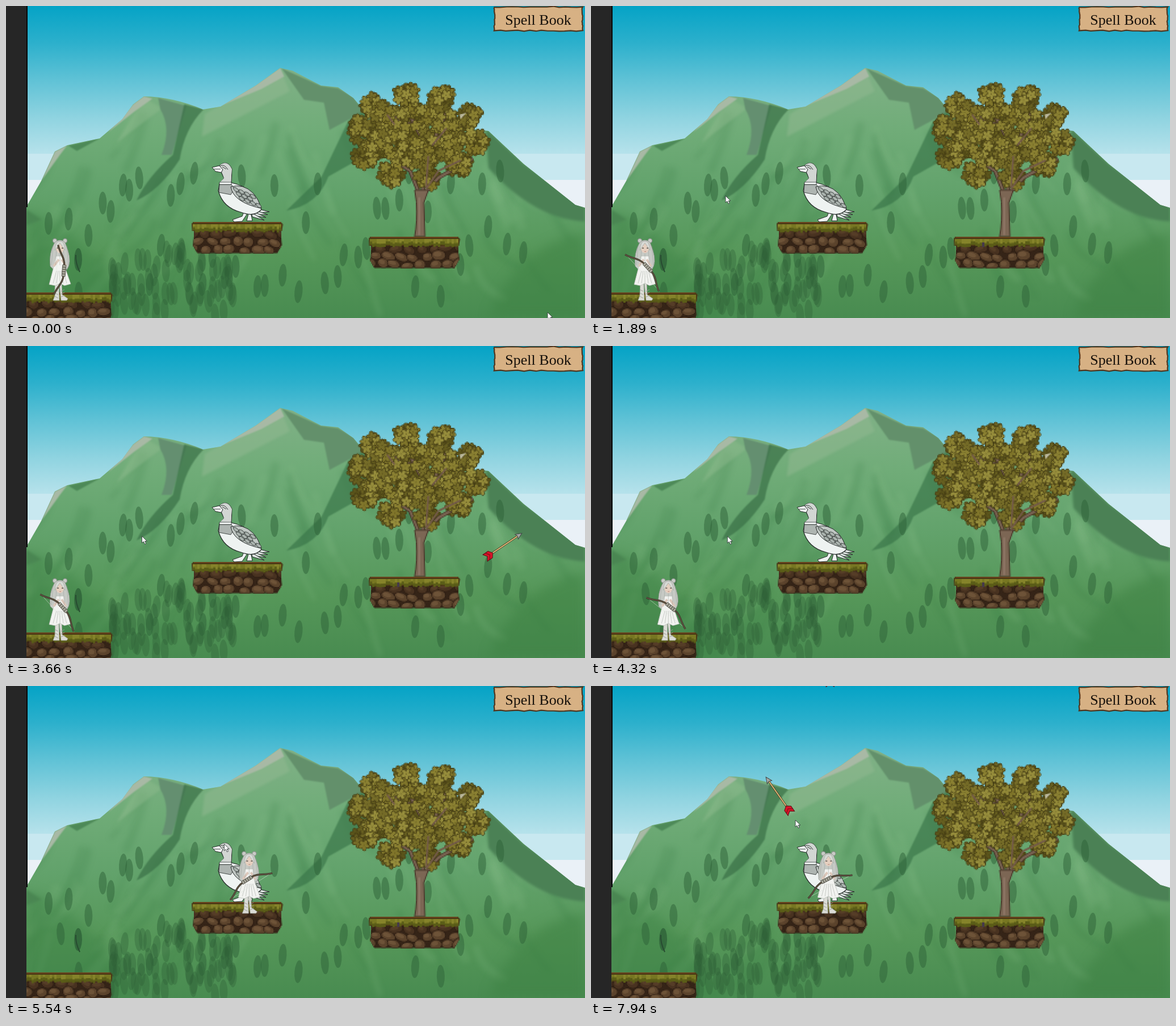
These frames come from a looping animation (1020x549 px, 8 s). An HTML page with a canvas:

```html
<!DOCTYPE html>
<html>
<head>
<meta charset="utf-8">
<style>
html, body { margin: 0; width: 100%; height: 100%; overflow: hidden; background: #262626; }
canvas { display: block; }
</style>
</head>
<body>
<canvas id="stage" width="1020" height="549"></canvas>
<script>
const W = 1020, H = 549, LOOP = 8000, TAU = Math.PI * 2;
const stage = document.getElementById('stage').getContext('2d');
const clamp = (v, a, b) => Math.min(b, Math.max(a, v));

let seed = 7;
const rand = (a = 0, b = 1) => {
  seed = (seed * 1664525 + 1013904223) % 4294967296;
  return a + (b - a) * seed / 4294967296;
};
const pick = list => list[Math.floor(rand(0, list.length))];

function layer(w, h) {
  const canvas = document.createElement('canvas');
  canvas.width = w;
  canvas.height = h;
  return canvas.getContext('2d');
}

function shape(c, d, fill, stroke, width = 1) {
  const p = new Path2D(d);
  if (fill) { c.fillStyle = fill; c.fill(p); }
  if (stroke) { c.strokeStyle = stroke; c.lineWidth = width; c.stroke(p); }
}

function oval(c, x, y, rx, ry, fill, turn = 0) {
  c.fillStyle = fill;
  c.beginPath();
  c.ellipse(x, y, rx, ry, turn, 0, TAU);
  c.fill();
}

function fade(c, y0, y1, colors) {
  const g = c.createLinearGradient(0, y0, 0, y1);
  colors.forEach((color, i) => g.addColorStop(i / (colors.length - 1), color));
  return g;
}

// Paints at half size and enlarges it for a chunky pixel look.
function pixelated(c, x, y, w, h, paint) {
  const small = layer(w / 2, h / 2);
  small.scale(.5, .5);
  small.translate(-x, -y);
  paint(small);
  c.imageSmoothingEnabled = false;
  c.drawImage(small.canvas, x, y, w, h);
  c.imageSmoothingEnabled = true;
}

function paintSky(c) {
  c.fillStyle = fade(c, 0, 260, ['#05a3c6', '#2cb0cc', '#5fc2d6', '#8ed3e0', '#b6e2eb']);
  c.fillRect(0, 0, W, 260);
  c.fillStyle = '#c8e8f0';
  c.fillRect(0, 260, W, 46);
  c.fillStyle = '#eaf1f7';
  c.fillRect(0, 306, W, 80);
}

function paintMountains(c) {
  c.save();
  const ridge = new Path2D('M36 353L62 308 86 256 108 245 165 233 205 199 224 173 243 159 Q295 160 347 182L378 177 440 140 483 109 505 114 555 140 585 143 612 162 640 195 850 220 912 278 1003 350 1020 355V549H36Z');
  c.fillStyle = fade(c, 110, H, ['#80b187', '#70ac78', '#62a26b', '#569759', '#488b50']);
  c.fill(ridge);
  c.clip(ridge);

  // long soft brush strokes down the slopes
  c.filter = 'blur(5px)';
  c.lineCap = 'round';
  for (let i = 0; i < 80; i++) {
    const x = rand(50, 980), y = rand(180, 470), lean = x < 480 ? -1 : 1;
    const tone = i % 2 ? 'rgba(140,195,140,.15)' : 'rgba(45,110,60,.13)';
    shape(c, `M${x} ${y}q${lean * 8} 35 ${lean * rand(20, 60)} ${rand(50, 100)}`, null, tone, rand(6, 18));
  }
  c.filter = 'blur(10px)';
  shape(c, 'M36 360Q150 400 230 549H36Z', 'rgba(60,130,70,.45)');
  shape(c, 'M850 549Q900 420 1020 400V549Z', 'rgba(62,130,68,.55)');

  c.filter = 'blur(2px)';
  shape(c, 'M483 112L350 190 345 230 500 150Z', 'rgba(145,185,145,.55)');
  shape(c, 'M243 161L195 240 275 180Z', 'rgba(140,185,140,.5)');
  shape(c, 'M845 215L912 278 1020 355V379Q930 375 850 285Z', '#4b8155');
  shape(c, 'M36 358L63 376 36 386Z', '#4a8652');

  c.filter = 'blur(1px)';
  shape(c, 'M268 162L318 176 292 262 274 262Q292 215 272 182Z', '#648f70');
  shape(c, 'M314 173L348 182Q315 215 306 270 270 325 230 342 250 300 294 262Z', 'rgba(57,111,70,.7)');
  shape(c, 'M486 110L555 141 585 145 612 161 630 186 570 218 560 170 525 165Z', '#63906b');
  shape(c, 'M632 182L602 204 556 300 494 360Q550 350 568 300L650 254Z', 'rgba(54,113,70,.62)');
  shape(c, 'M110 246L165 233 125 255Z', '#4d8958');
  for (const snow of ['M483 109L440 139 370 179 450 146 490 124Z', 'M243 159L224 173 180 222 226 186 258 163Z', 'M108 245L86 256 62 308 95 262Z'])
    shape(c, snow, '#a8b9a5');
  c.restore();
}

function paintBushes(c) {
  c.save();
  c.filter = 'blur(.7px)';
  const bush = (x, y, alpha) => oval(c, x, y, 7, 20, `rgba(46,98,56,${alpha})`, rand(-.1, .1));
  for (let x = 78; x < 920; x += 18) bush(x + rand(-6, 6), rand(290, 515), .5);
  for (let i = 0; i < 75; i++) {
    const x = rand(182, 400);
    bush(x, rand(415 + Math.abs(x - 290) * .4, 545), .36);
  }
  bush(127, 446, .8);
  c.restore();
  shape(c, 'M123 438Q122 452 130 468', null, '#284b31', 2);
}

function paintPlatform(c, x, y) {
  pixelated(c, x - 2, y - 2, 166, 60, p => {
    p.save();
    const block = new Path2D(`M${x + 5} ${y + 8}H${x + 156}L${x + 159} ${y + 40} ${x + 151} ${y + 55}H${x + 10}L${x + 3} ${y + 42}Z`);
    p.fillStyle = '#352417';
    p.fill(block);
    p.clip(block);
    for (let row = 0; row < 3; row++)
      for (let i = 0; i < 8; i++) {
        const sx = x + i * 23 + row % 2 * 11 + rand(-4, 4), sy = y + 21 + row * 14 + rand(-3, 3);
        const rx = rand(8, 13), ry = rand(6, 9), turn = rand(-.5, .5);
        oval(p, sx, sy, rx + 1, ry + 1, '#2a1b11', turn);
        oval(p, sx, sy, rx, ry, row ? '#5b432c' : '#483220', turn);
        oval(p, sx - 2, sy - 2, rx * .6, ry * .5, row ? '#6d5338' : '#553d27', turn);
      }
    p.restore();
    shape(p, `M${x + 3} ${y}H${x + 157}L${x + 161} ${y + 4} ${x + 159} ${y + 16}H${x + 1}L${x} ${y + 3}Z`, '#4a3715');
    for (let i = 2; i < 158; i += 4) {
      const drop = rand(4, 9);
      p.fillStyle = '#5a5c17';
      p.fillRect(x + i, y + 4, 4, 6 + drop);
      p.fillStyle = pick(['#85832a', '#777722']);
      p.fillRect(x + i, y + 4, 4, drop);
    }
    p.fillStyle = '#6a431d';
    p.fillRect(x + 4, y, 153, 2);
  });
}

function leaf(c, x, y, fill) {
  const turn = rand(0, TAU), petals = 5;
  for (const [r, color] of [[4, '#463e16'], [2.9, fill]])
    for (let i = 0; i < petals; i++) {
      const a = turn + i * TAU / petals;
      oval(c, x + Math.cos(a) * 5, y + Math.sin(a) * 5, r + 1.6, r, color, a);
    }
}

function paintTree(c) {
  // a broad core ringed by ten lobes
  const clumps = [[724, 226, 82, 54]];
  for (let i = 0; i < 10; i++) {
    const a = (i * 36 - 100) * TAU / 360;
    clumps.push([724 + Math.cos(a) * 103, 228 + Math.sin(a) * 73, 19, 19]);
  }
  const scatter = (p, density, colors) => {
    for (const [x, y, rx, ry] of clumps)
      for (let i = 0; i < rx * ry / density; i++) {
        const a = rand(0, TAU), r = Math.sqrt(rand());
        leaf(p, x + Math.cos(a) * r * rx, y + Math.sin(a) * r * ry, pick(colors));
      }
  };
  pixelated(c, 586, 120, 274, 290, p => {
    p.lineCap = p.lineJoin = 'round';
    scatter(p, 24, ['#5b541b', '#665e20', '#6e6624']);
    const limbs = 'M732 340L712 290 680 270M733 335L742 250 705 180M738 328L762 302 820 270M742 260L775 190M728 215L670 190';
    shape(p, limbs, null, '#46352a', 7);
    shape(p, limbs, null, '#78614f', 4);
    shape(p, 'M720 405Q725 380 723 345L720 324H744L736 346 738 405Z', '#7c6654', '#4c3a2d', 2);
    shape(p, 'M728 402V338', null, '#8f7967', 3);
    scatter(p, 38, ['#80762b', '#8a8032', '#918838', '#968d3c', '#756c28']);
    shape(p, 'M740 322L762 290 800 272M775 216L752 244M672 192L684 208M740 318L744 265', null, '#735a48', 3);
    shape(p, 'M799 191L811 188 801 199Z', '#b9b69b');
  });
}

function paintDuck(c) {
  const ink = '#252b29';
  c.save();
  c.lineJoin = 'round';
  for (let i = 0; i < 4; i++)
    shape(c, `M432 ${354 + i * 3}L${464 - i * 3} ${362 + i * 5} ${440 - i * 2} ${365 + i * 2}Z`, '#dfe6e2', ink);
  shape(c, 'M420 360L416 370 399 376 402 380 416 379 426 364M428 362L424 378 434 378 431 362', '#eef3f1', ink);
  shape(c, 'M377 280Q390 270 398 287L397 311Q440 320 450 358 438 372 414 363 382 355 374 325L376 313 384 303 380 294Z', '#eef3f1', ink, 1.2);
  shape(c, 'M377 280Q390 270 398 287L396 309 377 310 384 303Z', '#d2d6d3');
  shape(c, 'M376 314H397L402 321 396 332 375 328Z', '#aeb5b1', ink, .8);
  shape(c, 'M376 310H397V314H376Z', '#f6f9f8', ink, .8);
  shape(c, 'M376 281L363 284 369 291 379 293 382 288Z', '#f4f6f5', ink);
  shape(c, 'M366 287H378M378 281Q385 278 391 288M381 283L388 287', null, ink, .9);
  shape(c, 'M396 318Q418 312 435 329 446 341 449 356 400 345 396 318Z', '#c0c7c3', ink);
  for (let i = 0; i < 3; i++)
    for (let j = 0; j < 4 - i % 2; j++)
      shape(c, `M${400 + j * 10 + i * 5} ${319 + j * 4 + i * 8}q9 0 10 8q-8 1 -10 -8`, '#aab3ae', ink, .8);
  c.restore();
}

function paintButton(c) {
  const rough = () => rand(-1, 1);
  c.beginPath();
  for (let i = 0; i < 60; i++) {
    const along = i % 15 / 15, side = Math.floor(i / 15);
    const [u, v] = [[along, 0], [1, along], [1 - along, 1], [0, 1 - along]][side];
    c.lineTo(860.5 + u * 155 + rough(), 1.5 + v * 42 + rough());
  }
  c.closePath();
  c.fillStyle = '#d7b184';
  c.strokeStyle = '#50361f';
  c.lineWidth = 2.2;
  c.fill();
  c.stroke();
  c.fillStyle = '#17110b';
  c.font = '26px "Liberation Serif", serif';
  c.textAlign = 'center';
  c.fillText('Spell Book', 937.5, 33);
}

const scene = layer(W, H);
paintSky(scene);
paintMountains(scene);
paintBushes(scene);
paintTree(scene);
paintPlatform(scene, 27, 504);
paintPlatform(scene, 327, 380);
paintPlatform(scene, 639, 406);
paintDuck(scene);
paintButton(scene);

// Pointer stops: time, x, y.
const stops = [
  [70, 954, 539], [740, 279, 296], [1420, 279, 296], [1890, 237, 334], [4800, 241, 335],
  [5540, 384, 278], [6150, 575, 232], [6840, 477, 233], [7700, 360, 236], [LOOP, 360, 236]
];

function pointerAt(t) {
  const i = clamp(stops.findIndex(s => s[0] > t), 1, stops.length - 1);
  const [t0, x0, y0] = stops[i - 1], [t1, x1, y1] = stops[i];
  const k = clamp((t - t0) / (t1 - t0), 0, 1);
  return [x0 + (x1 - x0) * k, y0 + (y1 - y0) * k];
}

const GROUND = 518, LEDGE = 400, WALK = .24, SPEED = 720, GRAVITY = 567;

function girlAt(t) {
  const walked = (start, length) => WALK * clamp(t - start, 0, length);
  const x = 95 - walked(3700, 146) + walked(4003, 1535) - walked(7300, 42);
  const second = t >= 4350;
  const s = Math.max(0, t - (second ? 4350 : 2620)) / 1000;
  const floor = second && s > .48 ? LEDGE : GROUND;
  return [x, Math.min(floor, GROUND - 762 * s + 794 * s * s)];
}

function aimAt(t) {
  const [x, y] = girlAt(t), [px, py] = pointerAt(t);
  return [x, y - 53, Math.atan2(py - y + 53, px - x)];
}

const shots = [2201, 6457, 7210, 7685].map(start => [start, ...aimAt(start)]);

function drawArrow([start, x, y, angle], t) {
  const s = (t - start) / 1000, c = stage;
  if (s < 0 || s > 2) return;
  const reach = 10 + SPEED * s, dx = Math.cos(angle);
  c.save();
  c.translate(x + dx * reach, y + Math.sin(angle) * reach + GRAVITY / 2 * s * s);
  c.rotate(angle + .15 * Math.tanh(dx * 4) * Math.min(1, s * 4));
  shape(c, 'M-34 0H31', null, '#4c3820', 3.4);
  shape(c, 'M-34 0H31', null, '#e0bd7d', 1.8);
  shape(c, 'M39 0L28 -5 30 0 28 5Z', '#a5a7a3', '#3f4545');
  shape(c, 'M-39 -7H-28L-23 0 -28 7H-39L-34 0Z', '#d91428', '#5a1016');
  shape(c, 'M-34 -7L-29 0 -34 7', null, '#6d1018');
  c.restore();
}

function drawGirl(x, y) {
  const c = stage;
  c.save();
  c.translate(x, y);
  shape(c, 'M-8 -32L-9 -8 -12 0H-1L-2 -30ZM3 -32L4 -10 14 -3 12 0H2L-1 -30Z', '#dcdcd6', '#a3a6a0', .8);
  for (let i = 0; i < 3; i++)
    shape(c, `M-9 ${-19 + i * 6}l6 3M2 ${-16 + i * 5}l6 -3`, null, '#969b96', .9);
  for (const side of [-1, 1]) {
    oval(c, side * 9, -105, 4.2, 4.2, '#8f948f');
    oval(c, side * 9, -105, 3, 3, '#c9ccc7');
  }
  shape(c, 'M-9 -102Q-20 -83 -17 -60L-11 -54 0 -70 12 -54Q21 -66 14 -88L9 -102Q0 -110 -9 -102Z', '#c6c9c4', '#8f958f', .8);
  shape(c, 'M-7 -78L-12 -55 -19 -28 -8 -26 0 -30 8 -26 19 -29 10 -55 7 -78Z', '#f2f3f0', '#b9beb8', .8);
  shape(c, 'M-11 -60L-2 -72M11 -60L3 -72', null, '#dcc7ba', 4);
  for (let i = -2; i < 3; i++)
    shape(c, `M${i * 3} -52L${i * 6} -30M${i * 6} -96L${i * 7.5} -62`, null, 'rgba(150,156,150,.6)', .8);
  oval(c, 0, -92, 7, 9, '#e5cfbf');
  shape(c, 'M-9 -88Q-8 -105 0 -104Q8 -105 9 -88L0 -101Z', '#d8dad6', '#a1a6a0', .7);
  shape(c, 'M-5 -92H-2M3 -92H6', null, '#56544f', 1.4);
  shape(c, 'M-1 -86H2', null, '#b57f72');
  c.restore();
}

function drawBow(x, y, angle) {
  const c = stage, limb = 'M-7 -44C-3 -30 7 -23 7 -8V8C7 23 -3 30 -7 44';
  c.save();
  c.translate(x, y);
  c.rotate(angle);
  shape(c, 'M-6 -43V43', null, 'rgba(220,225,218,.7)', .7);
  shape(c, limb, null, '#38342b', 3.2);
  shape(c, limb, null, '#655643', 1.5);
  shape(c, 'M4 -10H10V10H4Z', '#aaa99d', '#45443c', .8);
  for (let i = -6; i < 10; i += 4) shape(c, `M4 ${i}h6`, null, '#4f4d43');
  c.restore();
}

function drawPointer(x, y) {
  stage.save();
  stage.translate(x, y);
  shape(stage, 'M0 0V12L3 9.5 5 14 7.2 13 5.2 8.8H9Z', '#fff', '#333b3b', .9);
  stage.restore();
}

function frame(now) {
  const t = now % LOOP;
  stage.drawImage(scene.canvas, 0, 0);
  if (t > 400) {
    stage.fillStyle = '#45394a';
    stage.fillRect(689, 416, 4, 8);
  }
  for (const shot of shots) drawArrow(shot, t);
  drawGirl(...girlAt(t));
  drawBow(...aimAt(t));
  stage.fillStyle = '#262626';
  stage.fillRect(0, 0, 36, H);
  stage.fillStyle = '#080a0a';
  stage.fillRect(36, 0, 2, 354);
  drawPointer(...pointerAt(t));
  requestAnimationFrame(frame);
}
requestAnimationFrame(frame);
</script>
</body>
</html>
```
